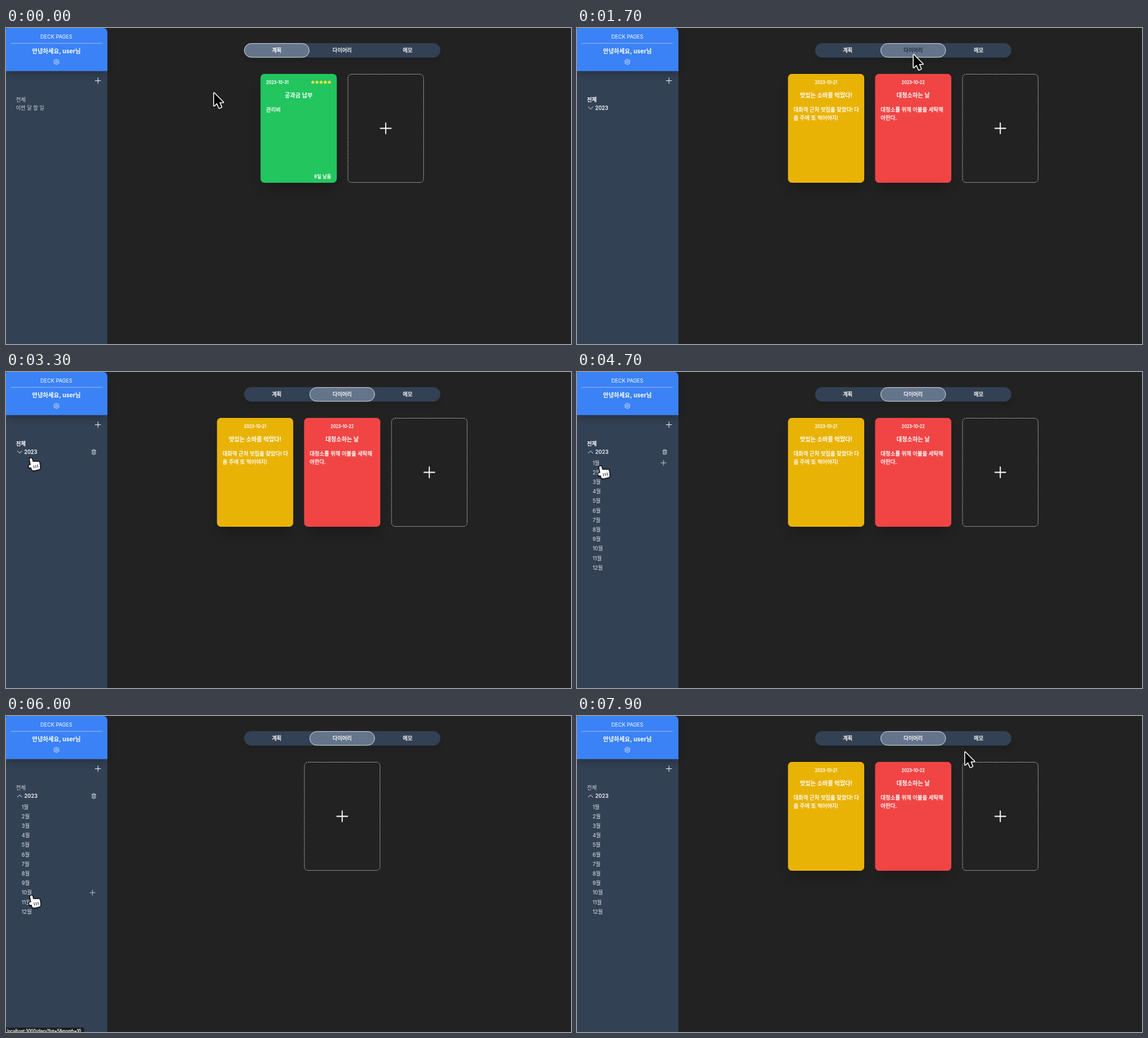
Recreate the animation shown at these times as an HTML page with a canvas. Size 960 by 537 pixels, loop 8000 ms.

```html
<!DOCTYPE html>
<html lang="ko">
<head>
<meta charset="utf-8">
<style>
  html, body { margin: 0; width: 100%; height: 100%; overflow: hidden; background: #222; }
  canvas { display: block; width: 960px; height: 537px; }
</style>
</head>
<body>
<canvas id="stage"></canvas>
<script>
const LOOP = 8000, STEP = 100;
const OPEN_DIARY = 1500, EXPAND_YEAR = 3800, PICK_JANUARY = 4800, PICK_OCTOBER = 6400;
const canvas = document.getElementById('stage');
const ctx = canvas.getContext('2d');
const ratio = window.devicePixelRatio || 1;
canvas.width = 960 * ratio;
canvas.height = 537 * ratio;

const FONT = 'Inter, "Noto Sans CJK KR", "Noto Sans CJK", sans-serif';
const SLATE = '#334155', SOFT = '#d0d5dc';
const CENTER = 571.25, CARD_W = 129.5, CARD_H = 185, CARD_TOP = 78, PITCH = 148;
const TAB_W = 111.2, SIDEBAR_W = 172.3, MONTH_TOP = 154.3, MONTH_H = 16.2;

// Icons on a 24-unit grid
const icons = {
  plus: new Path2D('M12 4.5v15M4.5 12h15'),
  pencil: new Path2D('M2.2 21.8L4 17.2 18.6 2.8a1.9 1.9 0 0 1 2.6 2.6L6.8 20ZM16.9 4.5l2.6 2.6'),
  check: new Path2D('M9 12.8l2.2 2.2L15 9.8M21 12a9 9 0 1 1-18 0 9 9 0 1 1 18 0'),
  trash: new Path2D('M4 6h16M8 6V3h8v3M5 6l1 15h12l1-15M9.5 9l.3 9M14.5 9l-.3 9'),
  down: new Path2D('M3.5 8l8.5 8 8.5-8'),
  up: new Path2D('M3.5 16l8.5-8 8.5 8')
};
const arrow = new Path2D('M.5 .5V22L5.6 17.6 9.2 26 13 24.4 9.5 16.3H16Z');
const hand = new Path2D();
hand.roundRect(-2, -1, 4.4, 16, 2.2);
for (let i = 1; i < 4; i++) hand.roundRect(-2 + 3.6 * i, 5 + 0.7 * i, 4.4, 10, 2.2);
hand.roundRect(-2, 9.5, 14.8, 11, 4);
hand.roundRect(-6, 10, 8, 4.6, 2.3);

// Each leg eases the pointer to a new resting point
const legs = [
  { from: 200, to: 600, x: 500, y: 185 },
  { from: 600, to: 900, x: 556.5, y: 68 },
  { from: 900, to: 1300, x: 571.5, y: 45 },
  { from: 2100, to: 2400, x: 418.5, y: 178 },
  { from: 2400, to: 3000, x: 60, y: 162 },
  { from: 3000, to: 3600, x: 24, y: 133 },
  { from: 4100, to: 4700, x: 39.5, y: 161 },
  { from: 5100, to: 6000, x: 42.7, y: 306 },
  { from: 6600, to: 7500, x: 620, y: 150 },
  { from: 7500, to: 7900, x: 659, y: 61 }
];

const tabs = ['계획', '다이어리', '메모'];
const bills = {
  color: '#22c55e', date: '2023-10-31', stars: 5, title: '공과금 납부', body: ['관리비'],
  left: '8일 남음', action: 'check'
};
const noodles = {
  color: '#e9b306', date: '2023-10-21', title: '맛있는 소바를 먹었다!',
  body: ['대화역 근처 맛집을 찾았다! 다', '음 주에 또 먹어야지!'], action: 'trash'
};
const cleaning = {
  color: '#f14545', date: '2023-10-22', title: '대청소하는 날',
  body: ['대청소를 위해 이불을 세탁해', '야한다.'], action: 'trash'
};

const clamp = v => Math.max(0, Math.min(1, v));
const smooth = v => v * v * (3 - 2 * v);
const inside = (p, x, y, w, h) => p.x >= x && p.x <= x + w && p.y >= y && p.y <= y + h;

function pointerAt(t) {
  let x = 353, y = 110;
  for (const leg of legs) {
    const k = smooth(clamp((t - leg.from) / (leg.to - leg.from)));
    x += (leg.x - x) * k;
    y += (leg.y - y) * k;
  }
  return { x, y };
}

// Share of the last 100 ms that the pointer spent on the card
function hoverLevel(t, cardX) {
  const samples = 10, pad = 5;
  let hits = 0;
  for (let i = 0; i < samples; i++) {
    const p = pointerAt(t - i * 100 / samples);
    if (inside(p, cardX - pad, CARD_TOP - 2 * pad, CARD_W + 2 * pad, CARD_H + 4 * pad)) hits++;
  }
  return smooth(hits / samples);
}

// Medium weight is the regular face with a hairline outline
function text(str, x, y, size, { weight = 400, color = '#fff', align = 'left' } = {}) {
  const medium = weight === 500;
  ctx.font = `${medium ? 400 : weight} ${size}px ${FONT}`;
  ctx.fillStyle = ctx.strokeStyle = color;
  ctx.textAlign = align;
  ctx.fillText(str, x, y + size * 0.36);
  if (medium) {
    ctx.lineWidth = 0.28;
    ctx.strokeText(str, x, y + size * 0.36);
  }
}

function box(x, y, w, h, radius, fill) {
  ctx.beginPath();
  ctx.roundRect(x, y, w, h, radius);
  if (fill) {
    ctx.fillStyle = fill;
    ctx.fill();
  }
}

function shadowBox(x, y, w, h, radius, fill, drop, blur, alpha) {
  ctx.save();
  ctx.shadowColor = `rgba(0,0,0,${alpha})`;
  ctx.shadowOffsetY = drop * ratio;
  ctx.shadowBlur = blur * ratio;
  box(x, y, w, h, radius, fill);
  ctx.restore();
}

function icon(name, cx, cy, size, color = '#fff', width = 1.5) {
  ctx.save();
  ctx.translate(cx - size / 2, cy - size / 2);
  ctx.scale(size / 24, size / 24);
  ctx.strokeStyle = color;
  ctx.lineWidth = width;
  ctx.lineCap = ctx.lineJoin = 'round';
  ctx.stroke(icons[name]);
  ctx.restore();
}

function polygon(cx, cy, count, radius) {
  ctx.beginPath();
  for (let i = 0; i < count; i++) {
    const a = i * 2 * Math.PI / count - Math.PI / 2, r = radius(i);
    ctx.lineTo(cx + r * Math.cos(a), cy + r * Math.sin(a));
  }
  ctx.closePath();
}

function gear(cx, cy) {
  ctx.strokeStyle = '#fff';
  ctx.lineWidth = 0.8;
  ctx.lineJoin = 'round';
  polygon(cx, cy, 24, i => (i + 1) % 4 < 2 ? 4.6 : 3.7);
  ctx.stroke();
  ctx.beginPath();
  ctx.arc(cx, cy, 1.6, 0, 7);
  ctx.stroke();
}

function drawCard(card, x, level) {
  const scale = 1 + 0.05 * level, cx = CARD_W / 2, cy = CARD_H / 2;
  ctx.save();
  ctx.translate(x + cx, CARD_TOP + cy);
  ctx.scale(scale, scale);
  ctx.translate(-cx, -cy);
  shadowBox(6, 6, CARD_W - 12, CARD_H - 12, 6.5, card.color, 14, 20, 0.28);
  box(0, 0, CARD_W, CARD_H, 6.5, card.color);

  text(card.date, card.stars ? 9.5 : cx, 14, 7, { weight: 500, align: card.stars ? 'left' : 'center' });
  for (let i = 0; i < (card.stars || 0); i++) {
    polygon(88.8 + 7.05 * i, 14.2, 10, k => k % 2 ? 1.8 : 3.8);
    ctx.fillStyle = '#fde047';
    ctx.fill();
  }
  text(card.title, cx, 36, 9.8, { weight: 700, align: 'center' });
  card.body.forEach((line, i) => text(line, 9.5, 60.5 + 14 * i, 8.95, { weight: 500 }));
  if (card.left) text(card.left, CARD_W - 9.5, 174.5, 7.9, { weight: 500, align: 'right' });

  if (level > 0) {
    box(0, 0, CARD_W, CARD_H, 6.5, `rgba(0,0,0,${0.5 * level})`);
    const [gap, y, size] = card.action === 'check' ? [21, 145.5, 25.7] : [18.4, 148, 20.5];
    ctx.globalAlpha = level;
    icon('pencil', cx - gap, y, size);
    icon(card.action, cx + gap, y, size);
  }
  ctx.restore();
}

function drawAddCard(x) {
  ctx.strokeStyle = '#d8d8d8';
  ctx.lineWidth = 0.9;
  ctx.setLineDash([1.8, 1.2]);
  box(x + 0.5, CARD_TOP + 0.5, CARD_W - 1, CARD_H - 1, 6.5);
  ctx.stroke();
  ctx.setLineDash([]);
  icon('plus', x + CARD_W / 2, CARD_TOP + CARD_H / 2, 29);
}

function drawTabs(t, pointer) {
  const left = CENTER - 1.5 * TAB_W, shift = clamp((t - OPEN_DIARY + 100) / 200);
  shadowBox(left, 25.8, 3 * TAB_W, 24.5, 12.2, SLATE, 6, 9, 0.12);
  tabs.forEach((label, i) => {
    const x = left + TAB_W * i;
    ctx.globalAlpha = [1 - shift, shift, 0][i];
    box(x + 0.5, 26.3, TAB_W - 1, 23.5, 11.7, '#64748b');
    ctx.strokeStyle = '#e5e7eb';
    ctx.lineWidth = 0.9;
    ctx.stroke();
    ctx.globalAlpha = 1;
    const hovered = inside(pointer, x, 26, TAB_W, 24);
    text(label, x + TAB_W / 2, 38, 8.8, { weight: 500, color: hovered ? '#1e293b' : '#fff', align: 'center' });
  });
}

function drawSidebar(t, pointer, row) {
  box(0, 0, SIDEBAR_W, 537, [3, 7, 0, 0], SLATE);
  shadowBox(0, 0, SIDEBAR_W, 73.3, [3, 7, 0, 0], '#3b82f6', 6, 12, 0.22);
  text('DECK PAGES', 85.6, 14.7, 8.7, { align: 'center' });
  ctx.fillStyle = 'rgba(255,255,255,.5)';
  ctx.fillRect(8, 25.6, 155, 0.9);
  text('안녕하세요, user님', 85.6, 39, 10, { weight: 700, align: 'center' });
  gear(85.6, 57.6);
  icon('plus', 156.2, 89.6, 15);

  if (t < OPEN_DIARY) {
    text('전체', 17, 122, 9, { color: SOFT });
    text('이번 달 할 일', 17, 135.7, 8.8, { color: SOFT });
    return;
  }
  const open = t >= EXPAND_YEAR;
  text('전체', 17, 122, 9, t < PICK_JANUARY ? { weight: 700 } : { color: SOFT });
  icon(open ? 'up' : 'down', 23.2, 136, 11, '#fff', 2);
  text('2023', 31, 136, 8.9, { weight: open ? 600 : 500 });
  if (inside(pointer, 0, 128, SIDEBAR_W, open ? 212 : 22)) icon('trash', 149.2, 136, 10.5, '#e5e7eb', 1.7);
  if (!open) return;
  for (let m = 0; m < 12; m++) {
    text(`${m + 1}월`, 26.4, MONTH_TOP + MONTH_H * m, 9, { color: '#e2e5ea' });
  }
  if (row >= 0) icon('plus', 147, MONTH_TOP + MONTH_H * row, 14, '#d6dae0');
}

function drawStatus(month) {
  box(-1, 529.5, 134, 10, [0, 3, 0, 0], '#1c1d20');
  text(`localhost:3000/diary?list=5&month=${month}`, 2, 535.6, 6.9, { weight: 500, color: '#f1f1f1' });
}

function drawPointer({ x, y }) {
  const isHand = x < 60, shape = isHand ? hand : arrow;
  ctx.save();
  ctx.translate(x, y);
  if (isHand) ctx.rotate(-0.2);
  ctx.lineJoin = 'round';
  ctx.strokeStyle = isHand ? '#000' : '#fff';
  ctx.fillStyle = isHand ? '#fff' : '#000';
  ctx.lineWidth = isHand ? 2.4 : 3;
  ctx.shadowColor = 'rgba(0,0,0,.35)';
  ctx.shadowBlur = 2 * ratio;
  ctx.shadowOffsetY = ratio;
  ctx.stroke(shape);
  ctx.shadowColor = 'transparent';
  ctx.fill(shape);
  if (isHand) {
    ctx.fillStyle = '#000';
    for (let i = 0; i < 3; i++) ctx.fillRect(2.2 + 3.2 * i, 12, 0.9, 5);
  }
  ctx.restore();
}

function draw(t) {
  const pointer = pointerAt(t);
  const onMonths = t >= EXPAND_YEAR && inside(pointer, 0, 146, SIDEBAR_W, 194);
  const row = onMonths ? Math.round((pointer.y - MONTH_TOP) / MONTH_H) : -1;
  ctx.setTransform(ratio, 0, 0, ratio, 0, 0);
  ctx.fillStyle = '#222';
  ctx.fillRect(0, 0, 960, 537);

  drawTabs(t, pointer);
  const empty = t >= PICK_JANUARY && t < PICK_OCTOBER;
  const cards = t < OPEN_DIARY ? [bills] : empty ? [] : [noodles, cleaning];
  const left = CENTER - CARD_W / 2 - cards.length * PITCH / 2;
  drawAddCard(left + cards.length * PITCH);
  cards.forEach((card, i) => {
    const x = left + PITCH * i;
    drawCard(card, x, hoverLevel(t, x));
  });

  drawSidebar(t, pointer, row);
  if (t >= PICK_JANUARY && row >= 0) drawStatus(row + 1);
  drawPointer(pointer);
}

function frame() {
  draw(Math.floor(performance.now() % LOOP / STEP) * STEP);
  requestAnimationFrame(frame);
}
frame();
</script>
</body>
</html>
```
